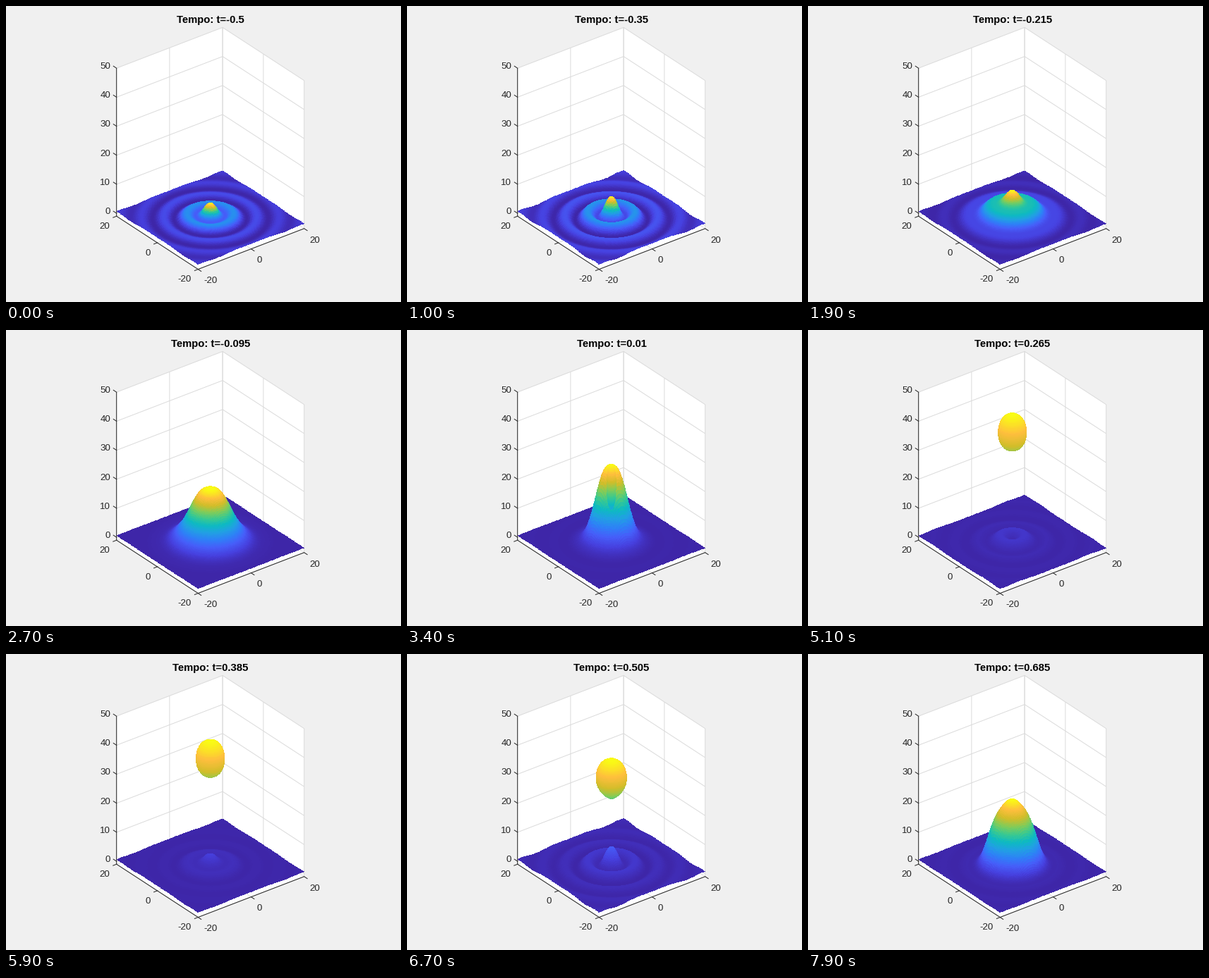
Write a matplotlib script that moves like this. It is 560 px wide and 420 px high and loops after 8000 ms.

```python
import numpy as np
import matplotlib.pyplot as plt
from matplotlib.animation import FuncAnimation
from matplotlib.colors import LinearSegmentedColormap

W, H, DPI = 560, 420, 100
FRAMES, STEP = 80, 100
INK, GRID = "#262626", "#dbdbdb"
APEX = 0.308   # time at which the drop is highest
N = 140

plt.rcParams["font.family"] = "Liberation Sans"
parula = LinearSegmentedColormap.from_list("parula", [
    "#3e26a8", "#4640de", "#465ef9", "#2e80f7", "#21a0e3", "#0db9c2",
    "#38c991", "#80cc59", "#d1bd29", "#febe3d", "#f9fb14"])


def project(x, y, z):
    """Orthographic view, azimuth -37.5, elevation 30, in stage pixels."""
    px = 289.7 + 3.76 * x - 2.89 * y
    py = 307 - 1.445 * x - 1.883 * y - 4.118 * (z + 1)
    return px, py


def bessel0(r):
    angles = (np.arange(48) + 0.5) * np.pi / 48
    return sum(np.cos(r * np.sin(a)) for a in angles) / 48


def smooth(v, start, end):
    u = np.clip((v - start) / (end - start), 0, 1)
    return u * u * (3 - 2 * u)


# Cells run from the far corner to the near one
axis = np.linspace(20, -20, N + 1)
gx, gy = np.meshgrid(axis, axis)
radius = np.hypot(gx, gy)
rings = bessel0(0.95 * radius) * np.exp(-(radius / 24) ** 2)
bump = np.exp(-(radius / 7) ** 2)
theta = np.linspace(0, 2 * np.pi, 61)
level = -np.cos(np.linspace(0, np.pi, 49))


def water(t):
    """Standing ripple plus a mound that swells before and after the flight."""
    tau = t - APEX
    away = abs(tau)
    swell = np.exp(-((away - 0.28) / 0.19) ** 2) * smooth(away, 0.2, 0.27)
    size = 4.5 + 5.5 * smooth(away, 0.2, 0.52)
    steep = 2.9 + 0.6 * np.tanh(4 * tau)
    ripple = 4.5 * np.cos(2 * np.pi * (t + 0.36) / 0.92) * (1 - 0.8 * swell)
    mound = 25 * swell * np.exp(-(radius / size) ** steep)
    return 0.6 + 2.5 * bump + ripple * rings + mound


def drop(t):
    """Body of revolution in free flight, rings from bottom to top."""
    tau = t - APEX
    size = (4.3 + 9 * tau ** 2) * smooth(abs(tau), 0.33, 0.24)
    low = 6 + 35 * tau ** 2
    tail = 0.5 + 10 * max(tau, 0) ** 2
    z = 38.6 - 200 * tau ** 2 + level * np.where(level > 0, 6.4, low)
    r = size * np.maximum(1 - level ** 2, 0) ** np.where(level > 0, 0.5, tail)
    return (np.outer(r, np.cos(theta)), np.outer(r, np.sin(theta)),
            np.outer(z, np.ones_like(theta)))


fig = plt.figure(figsize=(W / DPI, H / DPI), dpi=DPI, facecolor="#f0f0f0")
ax = fig.add_axes([0, 0, 1, 1])
ax.set_xlim(0, W)
ax.set_ylim(H, 0)
ax.axis("off")
ax.set_autoscale_on(False)


def line(*points, color=GRID, z=1):
    px, py = zip(*(project(*p) for p in points))
    ax.plot(px, py, color=color, lw=0.72, zorder=z, solid_capstyle="butt")


def tick(point, dx, dy, text, tx, ty, ha):
    px, py = project(*point)
    ax.plot([px, px + dx], [py, py + dy], color=INK, lw=0.72, zorder=1.5)
    ax.text(px + tx, py + ty + 4.8, text, ha=ha, va="baseline",
            fontsize=9.6, color=INK)


def draw_box():
    outline = [(-20, -20, -1), (20, -20, -1), (20, -20, 50),
               (20, 20, 50), (-20, 20, 50), (-20, 20, -1)]
    ax.fill(*zip(*(project(*p) for p in outline)), color="white", lw=0, zorder=0)
    for z in range(0, 51, 10):
        line((-20, 20, z), (20, 20, z), (20, -20, z))
        tick((-20, 20, z), -4.4, -2.9, str(z), -8.5, -4, "right")
    for v in (-20, 0, 20):
        line((v, -20, -1), (v, 20, -1), (v, 20, 50))
        line((-20, v, -1), (20, v, -1), (20, v, 50))
        tick((v, -20, -1), 4.4, 2.9, str(v), 8, 15, "left")
        tick((-20, v, -1), -4.9, 1.9, str(v), -10, 13, "right")
    line((-20, 20, 50), (-20, 20, -1), (-20, -20, -1), (20, -20, -1),
         color=INK, z=1.4)


def paint(x, y, z, low, high, order):
    cells = (z[:-1, :-1] + z[1:, :-1] + z[:-1, 1:] + z[1:, 1:]) / 4
    return ax.pcolormesh(*project(x, y, z), cells, cmap=parula, vmin=low,
                         vmax=high, shading="flat", zorder=order)


draw_box()
title = ax.text(290, 24, "", ha="center", va="baseline", fontsize=10.7,
                fontweight="bold", color="black")
meshes = []


def update(i):
    t = round(-0.5 + 0.015 * i, 3)
    while meshes:
        meshes.pop().remove()
    sea = water(t)
    low, high = sea.min(), sea.max()
    if abs(t - APEX) < 0.33:
        body = drop(t)
        high = max(high, body[2].max())
        meshes.append(paint(*body, low, high, 3))
    meshes.append(paint(gx, gy, sea, low, high, 2))
    title.set_text(f"Tempo: t={t:g}")
    return [*meshes, title]


anim = FuncAnimation(fig, update, frames=FRAMES, interval=STEP,
                     init_func=lambda: [title], repeat=True, repeat_delay=0)
plt.show()
```
